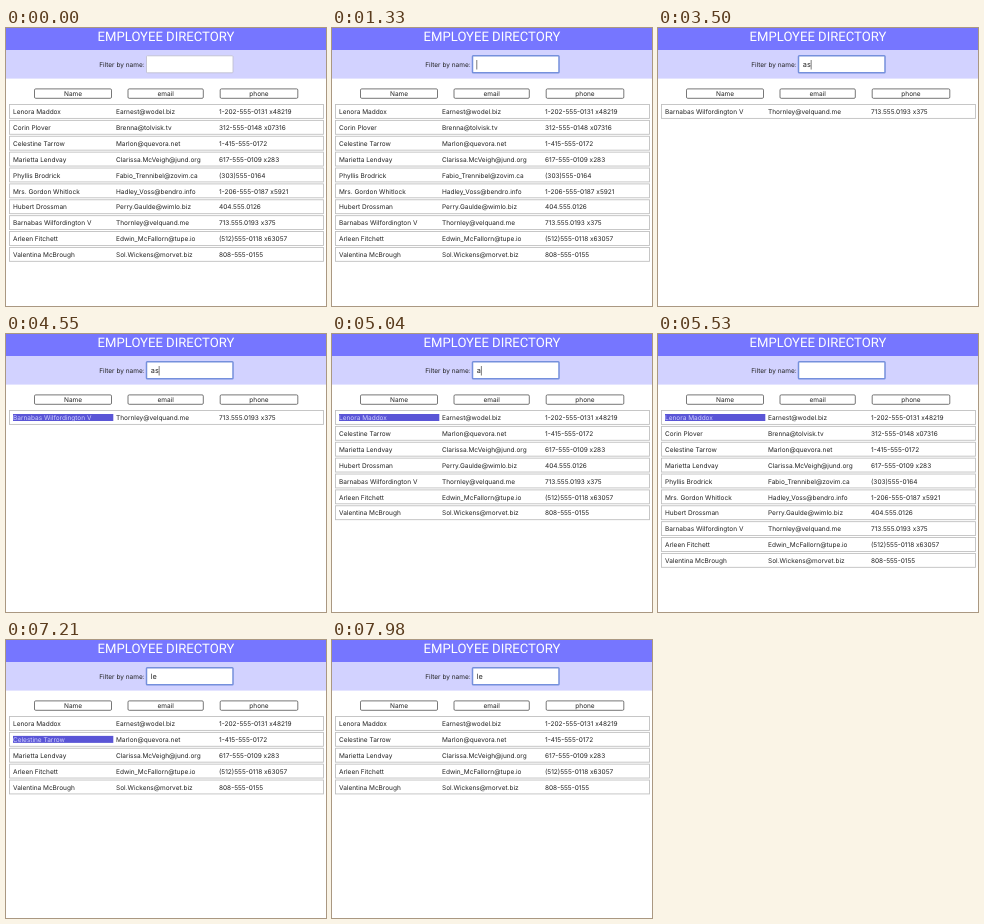
An HTML page that plays this animation: 320 px wide and 278 px high, repeating every 8 s.

```html
<!DOCTYPE html>
<html lang="en">
<head>
<meta charset="utf-8">
<title>Employee Directory</title>
<style>
  html, body { margin: 0; width: 100%; height: 100%; overflow: hidden; background: #fff; }
  svg { display: block; width: 100%; height: 100%; font: 6.5px Inter, "Open Sans", sans-serif; fill: #222; text-rendering: geometricPrecision; }
  .title { font: 13.1px Roboto, Inter, sans-serif; fill: #fff; }
  .centered { text-anchor: middle; }
  .button { fill: #fff; stroke: #555; stroke-width: .8; }
  .row { fill: #fff; stroke: #c0c0c0; stroke-width: .9; }
  .field { fill: #fff; stroke: #bcbccc; stroke-width: .8; }
  .focused .field { stroke: #7590dc; stroke-width: 1.5; }
  #query { font-size: 7.3px; fill: #222; }
  .mark { fill: #5a55d6; }
  .marked { fill: #d0d0ff; }
</style>
</head>
<body>
<svg id="stage" viewBox="0 0 320 278" preserveAspectRatio="none">
  <rect width="320" height="278" fill="#fff"/>
  <rect width="320" height="50.6" fill="#d2d2ff"/>
  <rect width="320" height="22" fill="#7676ff"/>
  <text class="title centered" x="160" y="12.7">EMPLOYEE DIRECTORY</text>
  <text x="93.2" y="38.6">Filter by name:</text>
  <g id="search">
    <rect class="field" x="140.5" y="27.8" width="86.5" height="17" rx=".8"/>
    <text id="query" x="144.8" y="39.2"></text>
    <rect id="caret" y="32" width=".7" height="9.5" fill="#444"/>
  </g>
  <g id="buttons"></g>
  <g id="list"></g>
</svg>
<script>
const LOOP = 8000;
const ROW_TOP = 76.5, ROW_PITCH = 15.88, COLUMNS = [7, 110, 213];

const people = [
  ["Lenora Maddox", "Earnest@wodel.biz", "1-202-555-0131 x48219"],
  ["Corin Plover", "Brenna@tolvisk.tv", "312-555-0148 x07316"],
  ["Celestine Tarrow", "Marlon@quevora.net", "1-415-555-0172"],
  ["Marietta Lendvay", "Clarissa.McVeigh@jund.org", "617-555-0109 x283"],
  ["Phyllis Brodrick", "Fabio_Trennibel@zovim.ca", "(303)555-0164"],
  ["Mrs. Gordon Whitlock", "Hadley_Voss@bendro.info", "1-206-555-0187 x5921"],
  ["Hubert Drossman", "Perry.Gaulde@wimlo.biz", "404.555.0126"],
  ["Barnabas Wilfordington V", "Thornley@velquand.me", "713.555.0193 x375"],
  ["Arleen Fitchett", "Edwin_McFallorn@tupe.io", "(512)555-0118 x63057"],
  ["Valentina McBrough", "Sol.Wickens@morvet.biz", "808-555-0155"]
];

// Each step changes only the listed parts of the state.
const steps = [
  [0, { query: "", focus: false, caret: false, hover: -1 }],
  [1330, { focus: true, caret: true }],
  [1610, { query: "a" }],
  [2240, { caret: false }],
  [2450, { query: "as", caret: true }],
  [3010, { caret: false }],
  [3500, { caret: true }],
  [3990, { caret: false }],
  [4200, { hover: 0 }],
  [4550, { caret: true }],
  [5040, { query: "a" }],
  [5530, { query: "", caret: false }],
  [5600, { caret: true }],
  [6160, { query: "l" }],
  [6300, { query: "le" }],
  [6860, { caret: false, hover: -1 }],
  [7210, { hover: 1 }],
  [7420, { caret: true }],
  [7910, { caret: false, hover: -1 }]
];

const byId = id => document.getElementById(id);
const stage = byId("stage"), search = byId("search"), query = byId("query");
const caret = byId("caret"), list = byId("list");

function add(parent, tag, attributes, text = "") {
  const node = document.createElementNS(stage.namespaceURI, tag);
  for (const [name, value] of Object.entries(attributes)) node.setAttribute(name, value);
  node.textContent = text;
  return parent.appendChild(node);
}

function addButton(label, x, width) {
  const group = byId("buttons");
  add(group, "rect", { class: "button", x, y: 60.9, width, height: 9.4, rx: 1.2 });
  add(group, "text", { class: "centered", x: x + width / 2, y: 68 }, label);
}

function addRow(person, index, hovered) {
  const y = ROW_TOP + index * ROW_PITCH;
  add(list, "rect", { class: "row", x: 3.5, y, width: 314, height: 13.9 });
  if (hovered) add(list, "rect", { class: "mark", x: 7, y: y + 3.5, width: 100.3, height: 7 });
  person.forEach((value, column) => add(list, "text", {
    class: hovered && column === 0 ? "marked" : "",
    x: COLUMNS[column], y: y + 9.6
  }, value));
}

function render(state) {
  search.classList.toggle("focused", state.focus);
  query.textContent = state.query;
  caret.setAttribute("x", 144.8 + (state.query ? query.getComputedTextLength() : -.3));
  caret.setAttribute("visibility", state.caret ? "visible" : "hidden");
  list.replaceChildren();
  people
    .filter(([name]) => name.toLowerCase().includes(state.query))
    .forEach((person, index) => addRow(person, index, index === state.hover));
}

let shown = 0;
function tick() {
  const time = performance.now() % LOOP;
  const count = steps.filter(([start]) => start <= time).length;
  if (count !== shown) {
    shown = count;
    render(Object.assign({}, ...steps.slice(0, count).map(([, change]) => change)));
  }
  requestAnimationFrame(tick);
}

addButton("Name", 28.5, 77);
addButton("email", 122, 75.3);
addButton("phone", 214.2, 77.6);
tick();
</script>
</body>
</html>
```
